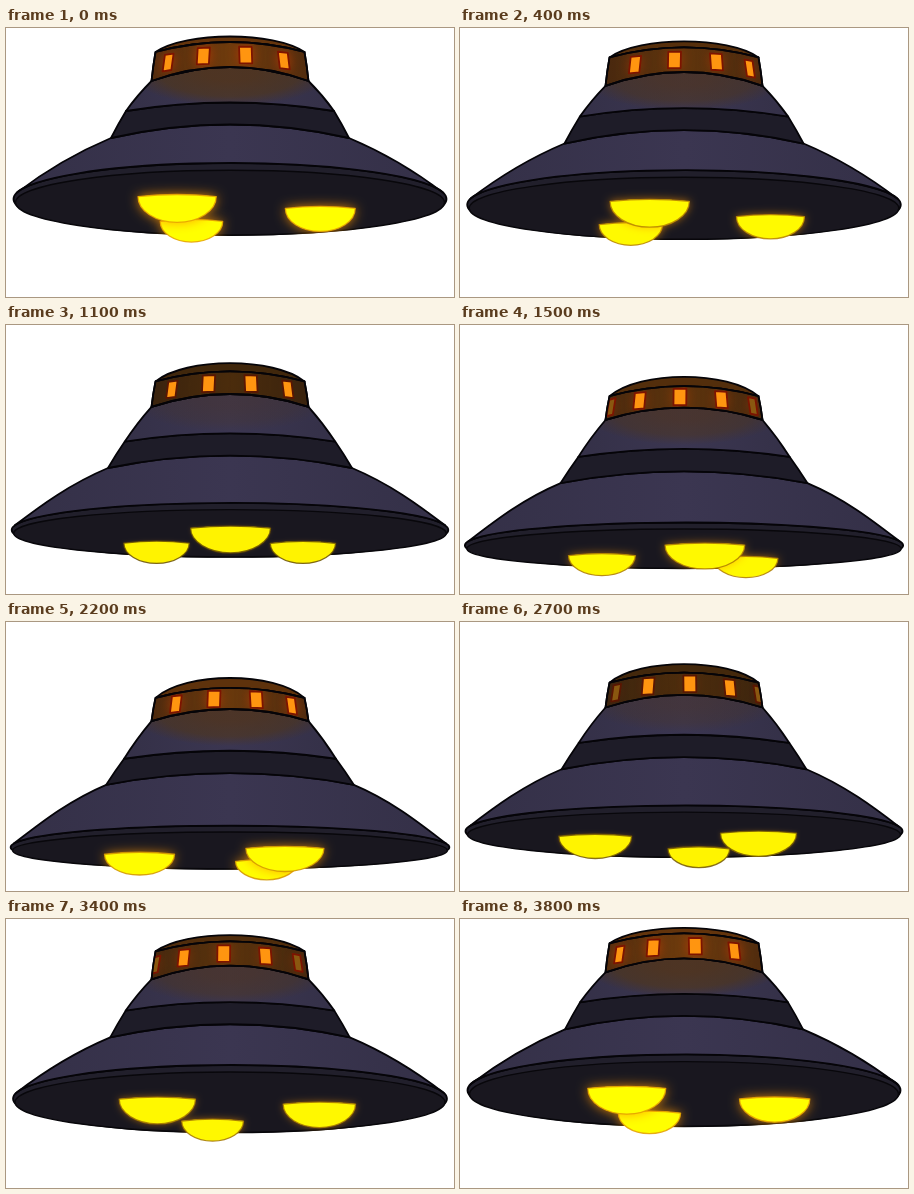
These frames come from a looping animation (448x269 px, 3900 ms). An HTML page with a canvas:

```html
<!DOCTYPE html>
<html lang="en">
<head>
<meta charset="utf-8">
<title>Saucer</title>
<style>
  html, body { margin: 0; width: 100%; height: 100%; overflow: hidden; background: #fff; }
  canvas { display: block; width: 448px; height: 269px; }
</style>
</head>
<body>
<canvas id="stage" width="448" height="269"></canvas>
<script>
const ctx = document.getElementById('stage').getContext('2d');
const LOOP = 3900, STEP = 100, CX = 224, TAU = Math.PI * 2, RAD = Math.PI / 180;

// Seams from top to bottom: [half width, side y, middle y], raised and lowered
const SEAMS = {
  bandTop:   [[74.5, 24, 14],   [74.5, 78, 68]],
  bandLow:   [[78.5, 53, 39],   [78.5, 101, 89]],
  stripeTop: [[104, 83, 74.5],  [106, 139, 131]],
  stripeLow: [[119, 110, 96.5], [124, 165, 153.5]]
};

const lerp = (a, b, p) => a + (b - a) * p;
const seamAt = (name, p) => {
  const [a, b] = SEAMS[name];
  const [w, side, mid] = a.map((v, i) => lerp(v, b[i], p));
  return { w, side, ctrl: 2 * mid - side, y: u => side + (mid - side) * (1 - u * u) };
};

function paint(path, fill, line = '#050408', width = 1.8) {
  if (fill) { ctx.fillStyle = fill; ctx.fill(path); }
  if (line) { ctx.strokeStyle = line; ctx.lineWidth = width; ctx.stroke(path); }
}

// Closed section between two seams, with its sides bulging outward
function section(top, low, bulge) {
  const path = new Path2D();
  const mx = (top.w + low.w) / 2 + bulge, my = (top.side + low.side) / 2 - bulge * 0.5;
  path.moveTo(CX - top.w, top.side);
  path.quadraticCurveTo(CX, top.ctrl, CX + top.w, top.side);
  path.quadraticCurveTo(CX + mx, my, CX + low.w, low.side);
  path.quadraticCurveTo(CX, low.ctrl, CX - low.w, low.side);
  path.quadraticCurveTo(CX - mx, my, CX - top.w, top.side);
  path.closePath();
  return path;
}

function across(half, edge, mid) {
  const g = ctx.createLinearGradient(CX - half, 0, CX + half, 0);
  g.addColorStop(0, edge);
  g.addColorStop(0.5, mid);
  g.addColorStop(1, edge);
  return g;
}

function drawDisc(p, low) {
  const cy = lerp(171, 227.5, p), rx = lerp(216.5, 219.5, p), ry = lerp(36, 21, p);
  const rim = new Path2D();
  rim.ellipse(CX, cy, rx, ry, 0, 0, TAU);
  paint(rim, '#211f2b');
  const under = new Path2D();
  const inset = lerp(3.6, 3.2, p);
  under.ellipse(CX, cy + inset, rx - 2, ry - inset, 0, 0, TAU);
  paint(under, '#19171f', '#08070b', 1.4);

  const edge = cy - ry * 0.17, ex = rx * 0.985;
  const skirt = new Path2D();
  skirt.moveTo(CX - low.w, low.side);
  skirt.quadraticCurveTo(CX, low.ctrl, CX + low.w, low.side);
  skirt.bezierCurveTo(CX + low.w + 38, low.side + 16, CX + ex - 26, edge - 20, CX + ex, edge);
  skirt.ellipse(CX, cy, rx, ry, 0, -Math.asin(0.17), Math.PI + Math.asin(0.17), true);
  skirt.bezierCurveTo(CX - ex + 26, edge - 20, CX - low.w - 38, low.side + 16, CX - low.w, low.side);
  paint(skirt, across(rx, '#343047', '#3b3651'));
}

function drawWindows(t, top, low, glow) {
  const turn = 11 + t / LOOP * 120;
  for (let i = 0; i < 12; i++) {
    const a = ((turn + i * 30 + 180) % 360 - 180) * RAD;
    if (Math.abs(a) > 66 * RAD) continue;
    const dx = 82 * Math.sin(a), u = dx / 76;
    const y = (top.y(u) + low.y(u)) / 2;
    const hw = 6 * Math.cos(a) + 0.4, lean = 1.4 * u, tilt = 1.6 * u;
    const pane = new Path2D();
    [[-1, -1], [1, -1], [1, 1], [-1, 1]].forEach(([sx, sy]) =>
      pane.lineTo(CX + dx + sx * hw + sy * lean, y + sy * 8.2 + sx * tilt * 0.5));
    pane.closePath();
    ctx.shadowColor = `rgba(210,60,0,${0.8 * glow})`;
    ctx.shadowBlur = 12;
    paint(pane, '#5a1602', null);
    ctx.shadowBlur = 0;
    paint(pane, Math.abs(a) > 54 * RAD ? '#8a5810' : '#ff9510', glow > 0.4 ? '#7c1400' : '#5a1602', 1.8);
  }
}

function drawDome(t, p, glow) {
  const top = seamAt('bandTop', p), low = seamAt('bandLow', p);
  const sTop = seamAt('stripeTop', p), sLow = seamAt('stripeLow', p);
  drawDisc(p, sLow);
  paint(section(sTop, sLow, 0.5), '#1e1c28');

  const neck = section(low, sTop, 1.5);
  paint(neck, across(110, '#343047', '#3b3651'), null);
  ctx.save();
  ctx.clip(neck);
  ctx.translate(CX, low.side - 8);
  ctx.scale(1, 0.33);
  const halo = ctx.createRadialGradient(0, 0, 25, 0, 0, 100);
  halo.addColorStop(0, `rgba(84,52,20,${0.25 + 0.5 * glow})`);
  halo.addColorStop(0.6, `rgba(84,54,16,${0.15 + 0.4 * glow})`);
  halo.addColorStop(1, 'rgba(84,54,16,0)');
  ctx.fillStyle = halo;
  ctx.fillRect(-120, -120, 240, 240);
  ctx.restore();
  paint(neck);

  const peak = lerp(8.5, 58, p), cy = (4 * peak - top.side) / 3;
  const cap = new Path2D();
  cap.moveTo(CX - top.w, top.side);
  cap.bezierCurveTo(CX - 44, cy, CX + 44, cy, CX + top.w, top.side);
  cap.quadraticCurveTo(CX, top.ctrl, CX - top.w, top.side);
  paint(cap, `rgb(${62 + 38 * glow},${38 + 14 * glow},12)`);

  const band = section(top, low, 0.5);
  paint(band, across(77, `rgb(${56 + 26 * glow},${34 + 10 * glow},14)`,
    `rgb(${72 + 38 * glow},${42 + 16 * glow},12)`));
  ctx.save();
  ctx.clip(band);
  drawWindows(t, top, low, glow);
  ctx.restore();
  paint(band);
}

function drawLamps(t, p, glow) {
  const wobble = -1.7 + 1.7 * Math.cos(TAU * t / LOOP);
  const base = -31.5 + t / LOOP * 120 + wobble;
  [0, 120, 240].map(k => (base + k) * RAD)
    .sort((a, b) => Math.cos(a) - Math.cos(b))
    .forEach(a => {
      const near = Math.cos(a), scale = 1 / (1 - 0.13 * near);
      const x = CX + 90 * Math.sin(a) * scale;
      const y = lerp(179, 233, p) - lerp(14.4, 7.2, p) * near + 1.8;
      const hw = 34.8 * scale, depth = hw * lerp(0.66, 0.59, p);
      const bowl = new Path2D();
      bowl.moveTo(x - hw, y);
      bowl.quadraticCurveTo(x, y - 4, x + hw, y);
      bowl.ellipse(x, y, hw, depth, 0, 0, Math.PI);
      bowl.closePath();
      // The glow falls only on what is already drawn
      ctx.save();
      ctx.globalCompositeOperation = 'source-atop';
      ctx.shadowColor = `rgba(255,150,0,${0.25 + 0.65 * glow})`;
      ctx.shadowBlur = 3 + 9 * glow;
      paint(bowl, '#fff000', null);
      ctx.restore();
      paint(bowl, `rgb(255,${242 + 13 * glow},0)`,
        `rgba(${100 + 130 * glow},${76 + 84 * glow},0,.85)`, 1.3);
    });
}

function draw(t) {
  const p = (1 - Math.cos(TAU * t / LOOP)) / 2;
  const glow = (1 + Math.cos(2 * TAU * t / LOOP)) / 2;
  ctx.clearRect(0, 0, 448, 269);
  ctx.lineJoin = 'round';
  drawDome(t, p, glow);
  drawLamps(t, p, glow);
}

const start = performance.now();
function tick() {
  const t = (performance.now() - start) % LOOP;
  draw(Math.floor(t / STEP) * STEP);
  requestAnimationFrame(tick);
}
tick();
</script>
</body>
</html>
```
